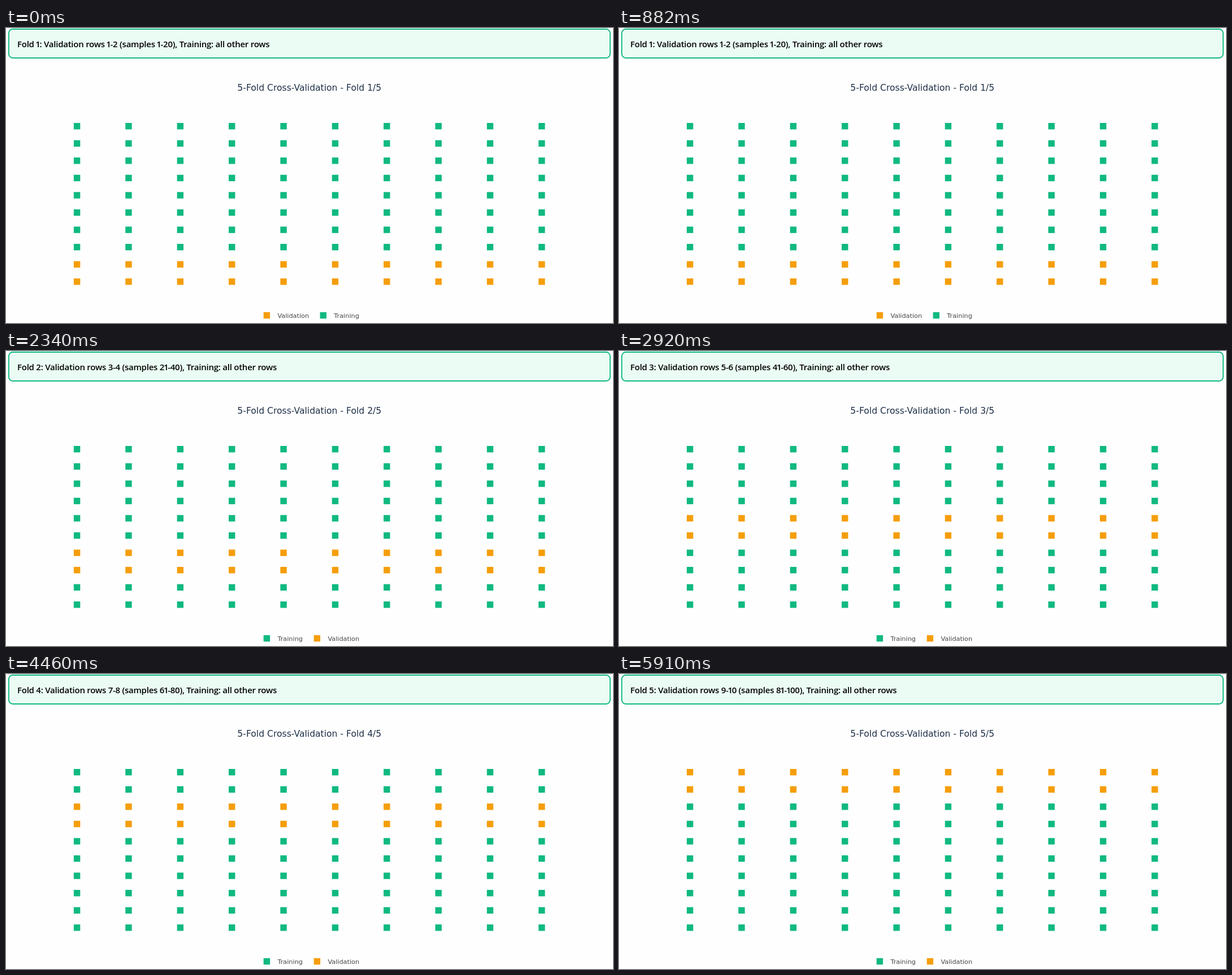
Recreate the animation shown at these times as an HTML page. Size 1074x522 px, loop 6440 ms.

```html
<!DOCTYPE html>
<html lang="en">
<head>
<meta charset="utf-8">
<title>5-Fold Cross-Validation</title>
<style>
  html, body { margin: 0; width: 100%; height: 100%; overflow: hidden; background: #fefefe; }
  svg { display: block; font-family: "DejaVu Sans", Verdana, sans-serif; }
  #banner { font: 600 15px "Open Sans", "Noto Sans", sans-serif; letter-spacing: -.25px; }
  #title { font-size: 15.6px; fill: #1e2f47; text-anchor: middle; }
  .legend { font-size: 11.3px; fill: #444; }
</style>
</head>
<body>
<svg width="1074" height="522" viewBox="0 0 1074 522">
  <rect x="4.9" y="2" width="1064" height="51" rx="7" fill="#ebfcf5" stroke="#10b981" stroke-width="1.9"/>
  <text id="banner" x="20" y="33.5"></text>
  <text id="title" x="536.8" y="110.5"></text>
  <g id="chart"></g>
</svg>
<script>
const GREEN = '#10b981', ORANGE = '#f59e0b';
const LOOP = 6440, STARTS = [0, 1470, 2920, 4460, 5910];
const SIZE = 11.4;
const byId = id => document.getElementById(id);

const square = (x, y, color) =>
  `<rect x="${x - SIZE / 2}" y="${y - SIZE / 2}" width="${SIZE}" height="${SIZE}" fill="${color}"/>`;

const legendItem = (x, label) =>
  square(x, 508.5, label === 'Training' ? GREEN : ORANGE) +
  `<text class="legend" x="${x + 19}" y="512.7">${label}</text>`;

// The digit 1 is set narrower than the other digits.
function setBanner(text) {
  const shifts = [...text].map((c, i) => -1.1 * ((c === '1') + (text[i - 1] === '1')));
  byId('banner').setAttribute('dx', shifts.join(' '));
  byId('banner').textContent = text;
}

function show(fold) {
  const last = fold * 2, first = last - 1;
  setBanner(`Fold ${fold}: Validation rows ${first}-${last} ` +
    `(samples ${first * 10 - 9}-${last * 10}), Training: all other rows`);
  byId('title').textContent = `5-Fold Cross-Validation - Fold ${fold}/5`;

  let marks = '';
  for (let row = 1; row <= 10; row++) {
    const color = row === first || row === last ? ORANGE : GREEN;
    for (let col = 0; col < 10; col++) {
      marks += square(125.6 + col * 91.37, 479.4 - row * 30.57, color);
    }
  }
  // Legend entries follow the order in which the groups first appear.
  marks += fold === 1
    ? legendItem(461.4, 'Validation') + legendItem(561.3, 'Training')
    : legendItem(461.4, 'Training') + legendItem(550.4, 'Validation');
  byId('chart').innerHTML = marks;
}

let shown = 0;
function tick() {
  const time = performance.now() % LOOP;
  const fold = STARTS.filter(start => start <= time).length;
  if (fold !== shown) show(shown = fold);
  requestAnimationFrame(tick);
}
tick();
</script>
</body>
</html>
```
